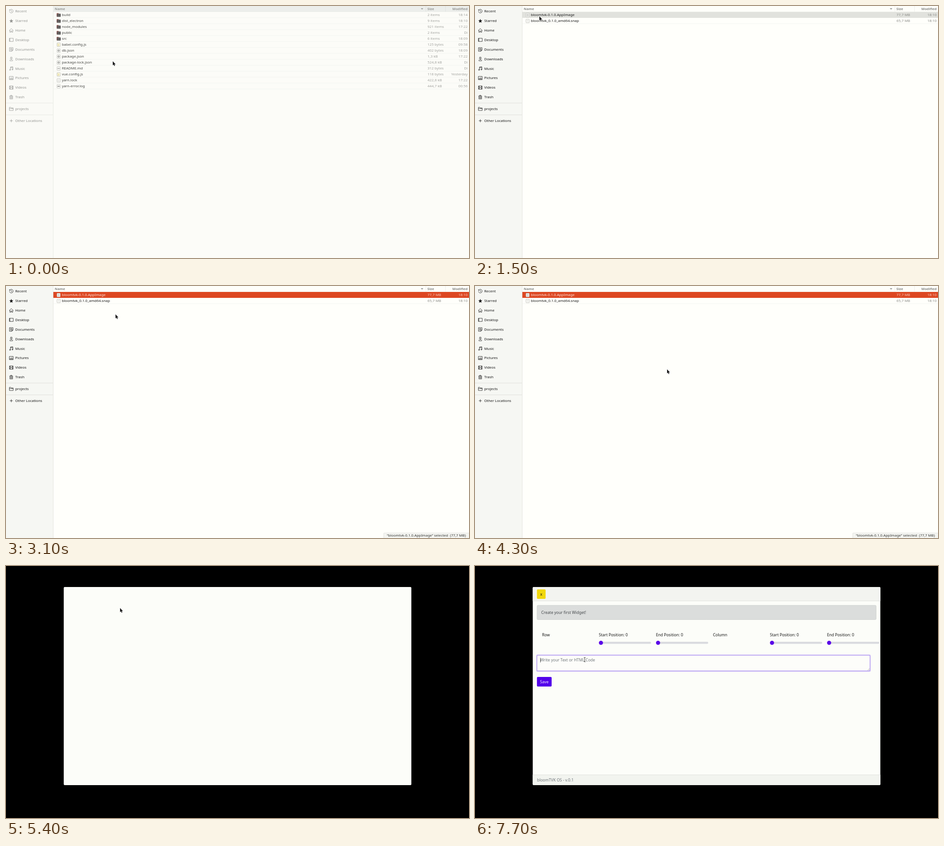
Recreate the animation shown at these times as an HTML page with a canvas. Size 1015 by 552 pixels, loop 8000 ms.

```html
<!DOCTYPE html>
<html lang="en">
<head>
<meta charset="utf-8">
<title>File manager and widget app</title>
<style>
html, body { margin: 0; width: 100%; height: 100%; overflow: hidden; background: #fffffb; }
canvas { display: block; width: 1015px; height: 552px; }
</style>
</head>
<body>
<canvas id="stage"></canvas>
<script>
const W = 1015, H = 552, LOOP = 8000;
const FONT = '"Noto Sans", "Open Sans", sans-serif';
const UI = 7.9, APP = 8.57;
const canvas = document.getElementById('stage');
const ctx = canvas.getContext('2d');
const dpr = window.devicePixelRatio || 1;
canvas.width = W * dpr;
canvas.height = H * dpr;

const PLACES = [
  ['Recent', 11.5, 'M1.6 2.6A4 4 0 1 1 1 5M1 1V3H3M5 2.6V5.2L6.8 6.2'],
  ['Starred', 32.5, 'M5 .8L6.2 3.8 9.4 4 6.9 6 7.8 9.2 5 7.4 2.2 9.2 3.1 6 .6 4 3.8 3.8Z', true],
  ['Home', 53.4, 'M.5 5.4L5 1 9.5 5.4M1.8 4.6V9H4V6.4H6V9H8.2V4.6'],
  ['Desktop', 74.2, 'M.7 1.5H9.3V8.5H.7ZM2 1.5V8.5'],
  ['Documents', 95.2, 'M1 1H8.8V6.4L6.2 9H1ZM2.6 3.2H7.2M2.6 5H7.2M2.6 6.8H4.8M6.2 9V6.4H8.8'],
  ['Downloads', 116.1, 'M3.4 4V1H6.6V4M2.4 4.4L5 7 7.6 4.4M2 7V9H8V7M5 3V6.6'],
  ['Music', 137, 'M3.2 7.8V1.6L8.4 1V7M3.2 3.2L8.4 2.6M1.4 7.8A1 .8 0 1 0 3.2 7.8A1 .8 0 1 0 1.4 7.8M6.6 7A1 .8 0 1 0 8.4 7A1 .8 0 1 0 6.6 7'],
  ['Pictures', 157.8, 'M.8 1.4H9.2V8.6H.8ZM2 7.2L4 4.4 5.4 6 6.6 5 8 7.2ZM6 3.2H7'],
  ['Videos', 178.7, 'M1 1.4H9V8.6H1ZM2.8 1.4V8.6M7.2 1.4V8.6M2.8 5H7.2M1 3.2H2.8M1 6.6H2.8M7.2 3.2H9M7.2 6.6H9'],
  ['Trash', 199.6, 'M1 2.6H8.6M3.4 2.4V1H6.2V2.4M1.8 2.8V9H8V2.8M3.6 4.4H6.4V7.2H3.6Z'],
  ['projects', 225.3, 'M.8 8.6V1.6H3.8L4.8 3H9.2V8.6ZM.8 4.4H9.2'],
  ['Other Locations', 251.2, 'M5 2V8.4M1.8 5.2H8.2']
].map(([name, y, d, solid]) => ({ name, y, icon: new Path2D(d), solid }));

const PROJECT = [
  ['build', '2 items', '18:14', 'dir'],
  ['dist_electron', '9 items', '18:10', 'dir'],
  ['node_modules', '921 items', '17:22', 'dir'],
  ['public', '2 items', 'Di', 'dir'],
  ['src', '6 items', '18:09', 'dir'],
  ['babel.config.js', '125 bytes', '09:58', 'js'],
  ['db.json', '402 bytes', '18:09', 'json'],
  ['package.json', '1,3 kB', '17:22', 'json'],
  ['package-lock.json', '524,8 kB', 'Di', 'json'],
  ['README.md', '312 bytes', 'Di', 'md'],
  ['vue.config.js', '118 bytes', 'Yesterday', 'js'],
  ['yarn.lock', '422,8 kB', '17:22', 'text'],
  ['yarn-error.log', '444,7 kB', '00:56', 'log']
];
const BUILD = [
  ['bloomTVK-0.1.0.AppImage'.toLowerCase().replace('appimage', 'AppImage'), '77,7 MB', '18:10', 'app'],
  ['bloomtvk_0.1.0_amd64.snap', '65,7 MB', '18:10', 'unknown']
];

// Pointer positions: time, x, y; each is held until the next.
const POINTER = [
  [0, 234, 121], [200, 205, 88], [300, 150, 42], [400, 108, 17], [600, 145, 17],
  [800, 143, 20], [900, 141, 22.5], [1700, 150, 27], [1900, 163, 33.5],
  [2000, 178, 28], [2100, 187, 24], [2300, 186, 22.5], [2400, 185, 21.5],
  [3100, 240, 62], [3200, 350, 136], [3300, 421, 182.5], [5000, 220.7, 44],
  [5400, 250, 92], [5500, 275, 128], [5600, 288, 147], [5800, 270, 135],
  [5900, 245, 122], [6000, 215, 111], [6100, 189.8, 103.7], [6200, 170, 100],
  [6300, 155, 96], [6400, 146, 92.5], [6500, 141, 92], [6600, 145, 95],
  [6700, 190, 96], [6800, 245, 97.5], [6900, 285, 98.5], [7200, 278, 126],
  [7300, 257, 168], [7400, 240.5, 205]
];
const ARROW = new Path2D('M0 0V9L2 7.2 3.5 10.5 5 9.8 3.6 6.7H6.4Z');

const held = (keys, t) => keys.filter(k => k[0] <= t).pop();

function mix(a, b, k) {
  const part = (c, i) => parseInt(c.slice(i, i + 2), 16);
  return 'rgb(' + [1, 3, 5].map(i => Math.round(part(a, i) + (part(b, i) - part(a, i)) * k)) + ')';
}

function rect(x, y, w, h, fill, radius = 0, stroke) {
  ctx.beginPath();
  ctx.roundRect(x, y, w, h, radius);
  if (fill) { ctx.fillStyle = fill; ctx.fill(); }
  if (stroke) { ctx.strokeStyle = stroke; ctx.lineWidth = 0.8; ctx.stroke(); }
}

// y is the middle of the lowercase letters.
function text(str, x, y, color, size = UI, align = 'left', weight = 400) {
  ctx.font = `${weight} ${size}px ${FONT}`;
  ctx.textAlign = align;
  ctx.fillStyle = color;
  ctx.fillText(str, x, y + size * 0.34);
}

function fileIcon(kind, y) {
  if (kind === 'dir') {
    rect(111.2, y - 4, 4.4, 3, '#a0504c', 0.8);
    rect(111.2, y - 3.1, 8.8, 7, '#62605f', 0.9);
    rect(111.2, y - 3.1, 1.2, 6.4, '#81514e', 0.6);
    return;
  }
  rect(111.8, y - 3.9, 7.2, 7.8, kind === 'js' ? '#fbf8df' : '#fbfbf8', 0.8, '#b9bab5');
  if (kind === 'js') {
    rect(113.2, y - 1.8, 2, 0.8, '#d8c66a');
    rect(113.8, y, 3.2, 0.8, '#d8c66a');
    rect(113.2, y + 1.8, 2.4, 0.8, '#d8c66a');
  } else if (kind === 'json' || kind === 'app') {
    ctx.beginPath();
    ctx.arc(115.4, y, 1.6, 0, Math.PI * 2);
    ctx.strokeStyle = kind === 'json' ? '#666764' : '#a0a19c';
    ctx.lineWidth = 1;
    ctx.stroke();
  } else if (kind === 'unknown') {
    text('?', 115.4, y, '#aaaba6', 5, 'center');
  } else if (kind === 'text') {
    for (const dy of [-1.8, 0, 1.8]) rect(113.2, y + dy, 4, 0.5, '#c5c6c1');
  } else {
    rect(113, y - 0.6, 4.8, 1.2, kind === 'log' ? '#555653' : '#8b8c88');
  }
}

function sidebar(blur) {
  const ink = mix('#161616', '#949592', blur);
  rect(0, 0, 103, H, mix('#f6f7f3', '#fafaf6', blur));
  rect(103, 0, 0.8, H, mix('#dcddd8', '#e4e5e0', blur));
  for (const y of [212, 238]) rect(0, y, 103, 0.8, mix('#d8d9d4', '#e2e3de', blur));
  for (const place of PLACES) {
    ctx.save();
    ctx.translate(6.6, place.y - 5);
    ctx.strokeStyle = ctx.fillStyle = ink;
    ctx.lineWidth = 0.8;
    if (place.solid) ctx.fill(place.icon); else ctx.stroke(place.icon);
    ctx.restore();
    text(place.name, 20.2, place.y, ink);
  }
}

function columnHeads(blur) {
  const ink = mix('#888986', '#979895', blur);
  rect(103.8, 0, W, 12.6, mix('#fefefa', '#eceeeb', blur));
  rect(103.8, 12.4, W, 0.7, mix('#eeefea', '#e3e5e1', blur));
  for (const x of [920, 963]) rect(x, 0, 0.7, 12.6, mix('#e8e9e4', '#dcdeda', blur));
  text('Name', 106.8, 6.2, ink, 7.6, 'left', 700);
  text('Size', 923.8, 6.2, ink, 7.6, 'left', 700);
  text('Modified', 1012, 6.2, ink, 7.6, 'right', 700);
  ctx.beginPath();
  ctx.moveTo(909.4, 5);
  ctx.lineTo(914.8, 5);
  ctx.lineTo(912.1, 7.8);
  ctx.fillStyle = ink;
  ctx.fill();
}

function fileList(files, blur, hover, selected) {
  files.forEach(([name, size, date, kind], i) => {
    const top = 13 + i * 13, y = top + 6.8, on = i === selected;
    if (on) rect(103.8, top, W, 13, '#dd4722');
    else if (i === hover) rect(103.8, top, W, 13, '#e1e2dd');
    else rect(103.8, top + 12.6, W, 0.6, '#f0f1ed');
    const soft = on ? '#f6c8ba' : mix('#8b8c88', '#a2a39f', blur);
    fileIcon(kind, y);
    text(name, 122.4, y, on ? '#fbe6df' : mix('#171717', '#464744', blur));
    text(size, 924, y, soft);
    text(date, 1012, y, soft, UI, 'right');
  });
}

function statusBar(label, blur) {
  ctx.font = `400 ${UI}px ${FONT}`;
  const left = 1008 - ctx.measureText(label).width - 7;
  rect(left, 541, W - left + 4, 14, '#f4f5f1', 1, '#dddeda');
  text(label, 1008, 546.6, mix('#333432', '#8b8c89', blur), UI, 'right');
}

function fileManager(t, pointerY) {
  const blur = held([[0, 1], [1200, 0.5], [1300, 0], [4400, 0.5], [4500, 1]], t)[1];
  const inBuild = t >= 1400;
  const files = inBuild ? BUILD : PROJECT;
  const selected = (t >= 1200 && t < 1400) || t >= 2500 ? 0 : -1;
  const hover = blur ? -1 : Math.floor((pointerY - 13) / 13);
  rect(0, 0, W, H, mix('#fffffb', '#fcfcf8', blur));
  sidebar(blur);
  columnHeads(blur);
  fileList(files, blur, hover, selected);
  if (selected === 0) {
    const [name, size] = files[0];
    statusBar(`“${name}” selected  (${inBuild ? size : 'containing ' + size})`, blur);
  }
}

function slider(x, label) {
  text(label + ' Position: 0', x, 150.8, '#161616', APP);
  rect(x + 0.5, 166, 114, 4.4, '#dadbdf', 2.2);
  ctx.beginPath();
  ctx.arc(x + 4.6, 168.2, 4.5, 0, Math.PI * 2);
  ctx.fillStyle = '#5a08e8';
  ctx.fill();
}

function textArea(focus) {
  if (focus) rect(134.4, 194, 733, 37.4, '#cdbdf6', 2.5);
  rect(136, 195.8, 729.8, 33.8, '#fdfdfa', 2, focus ? '#a58aef' : '#c6cacb');
  text('Write your Text or HTML Code', 142.9, 206.4, '#70777c', APP);
  ctx.beginPath();
  for (const d of [2, 4.5]) {
    ctx.moveTo(865 - d, 228.8);
    ctx.lineTo(865, 228.8 - d);
  }
  ctx.strokeStyle = '#85868a';
  ctx.lineWidth = 0.6;
  ctx.stroke();
  if (focus) rect(143, 201.3, 0.8, 10, '#222');
}

function app(t) {
  rect(0, 0, W, H, '#000');
  rect(126.6, 46, 762, 434, '#fcfdf9', 2);
  if (t < 5500) return;
  rect(126.6, 46, 762, 30.5, '#f3f4f0', [2, 2, 0, 0]);
  rect(126.6, 76.2, 762, 0.8, '#d9dad7');
  rect(135.8, 51.3, 19, 20.8, '#f1d80c', 2);
  text('x', 145.2, 62, '#1b1b10', APP, 'center');
  rect(136, 86.1, 743.4, 31.4, '#dbdddc', 2, '#cccecd');
  text('Create your first Widget!', 145.2, 101.9, '#43474a', APP);
  text('Row', 147, 150.8, '#161616', APP);
  text('Column', 521.7, 150.8, '#161616', APP);
  for (const x of [271.5, 646.5]) {
    slider(x, 'Start');
    slider(x + 125.2, 'End');
  }
  textArea(t >= 7600);
  rect(135.8, 243, 32.2, 21, '#5300ea', 2);
  text('Save', 151.9, 253.6, '#f4f0ff', APP, 'center');
  rect(126.6, 457.4, 762, 22.6, '#f2f4ef', [0, 0, 2, 2]);
  rect(126.6, 457, 762, 0.8, '#d9dad7');
  text('bloomTVK OS - v.0.1', 135.9, 468.7, '#6d7378', APP);
}

function drawPointer(x, y, beam) {
  ctx.save();
  ctx.translate(x, y);
  if (beam) {
    rect(-0.4, -4.5, 0.9, 9.4, '#333');
    rect(-2, -5, 4.1, 0.8, '#333');
    rect(-2, 4.4, 4.1, 0.8, '#333');
  } else {
    ctx.strokeStyle = '#fff';
    ctx.lineWidth = 1.2;
    ctx.stroke(ARROW);
    ctx.fillStyle = '#1d1d1d';
    ctx.fill(ARROW);
  }
  ctx.restore();
}

function draw(t) {
  const [, x, y] = held(POINTER, t);
  ctx.setTransform(dpr, 0, 0, dpr, 0, 0);
  if (t < 5000) fileManager(t, y);
  else if (t < 5400) rect(0, 0, W, H, '#fffffc');
  else app(t);
  drawPointer(x, y, t >= 7400);
}

const start = performance.now();
function tick() {
  draw((performance.now() - start) % LOOP);
  requestAnimationFrame(tick);
}
tick();
</script>
</body>
</html>
```
